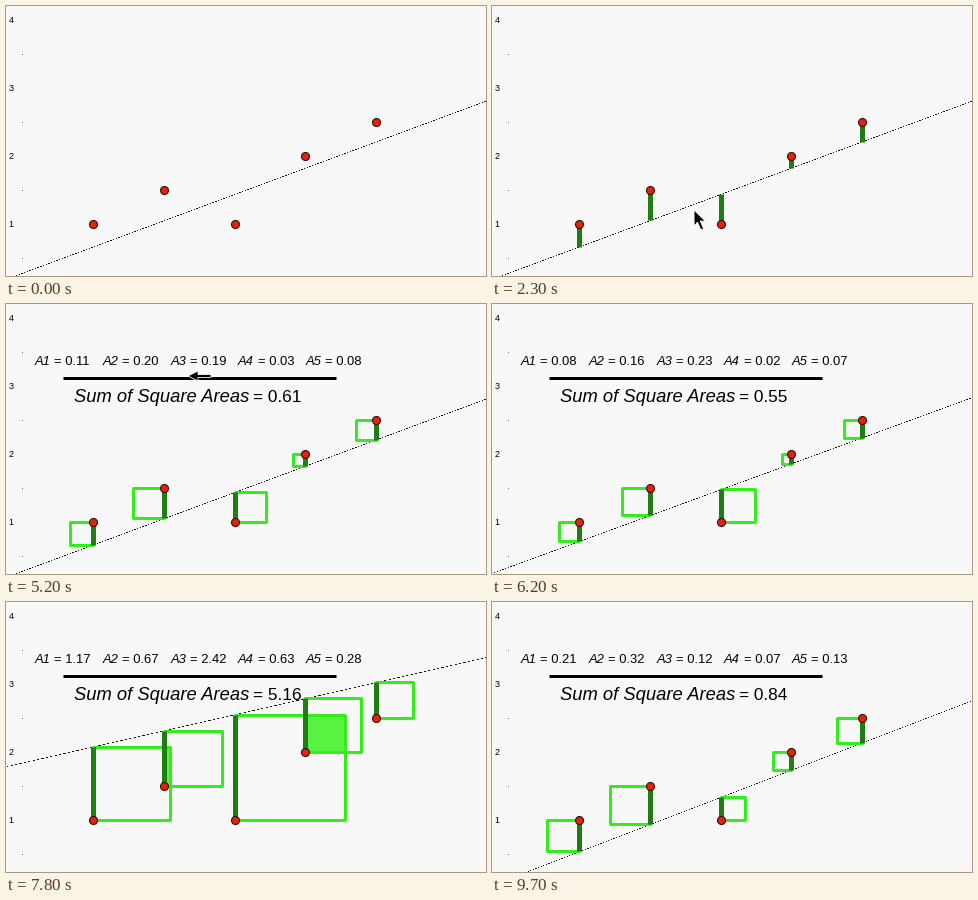
Recreate the animation shown at these times as a matplotlib script. Size 480x270 px, loop 9800 ms.

```python
import numpy as np
import matplotlib.pyplot as plt
from matplotlib.animation import FuncAnimation
from matplotlib.patches import Polygon, Rectangle

W, H, DPI = 480, 270, 100
PX = 72 / DPI  # points per pixel
STEP, FRAMES = 100, 98

BG, RED = "#f8f8f8", "#e8200c"
DARK_GREEN, GREEN, FILL = "#1f7d14", "#32ee1c", "#58f240"
FONT = "Liberation Sans"

DATA = list(enumerate([1, 1.5, 1, 2, 2.5], start=1))
SEGMENTS_AT, SQUARES_AT, SUMS_AT = 600, 3300, 4300

# Dragging the line: (ms, its height at x = 1)
DRAG = [(5600, 0.668), (6000, 0.58), (7000, 1.2755), (7800, 2.081),
        (8500, 1.6265), (9700, 0.5382)]
# Mouse stops: (ms, x, y)
MOUSE = [(1100, 110, 236), (2300, 202, 204), (3000, 376, 128),
         (5200, 182, 72), (5900, 60, 292)]


def sx(x):
    return 16.6 + 70.7 * x


def sy(y):
    return 286 - 67.9 * y


def follow(keys, t):
    """Values of a keyed path at time t."""
    times, *tracks = zip(*keys)
    return [np.interp(t, times, track) for track in tracks]


def arrow(head, half, notch, length, angle):
    """Arrow outline with its tip at the origin, tail towards the angle."""
    side = np.array([(0, 0), (head, half), (notch, 1.5), (length, 1.5)])
    outline = np.vstack([side, side[:0:-1] * (1, -1)])
    c, s = np.cos(np.radians(angle)), np.sin(np.radians(angle))
    return outline @ np.array([(c, s), (-s, c)])


def add_box(**style):
    return ax.add_patch(Rectangle((0, 0), 0, 0, **style))


def set_box(patch, x0, y0, x1, y1):
    patch.set_bounds(x0, y0, x1 - x0, y1 - y0)
    return patch


def stroke(color, width, **kw):
    return ax.plot([], [], color=color, lw=width * PX,
                   solid_capstyle="butt", **kw)[0]


def label(x, y, text, size, style="normal"):
    return ax.text(x, y, text, fontsize=size * PX, family=FONT, style=style,
                   color="black", zorder=6)


fig = plt.figure(figsize=(W / DPI, H / DPI), dpi=DPI, facecolor=BG)
ax = fig.add_axes([0, 0, 1, 1])
ax.set_xlim(0, W)
ax.set_ylim(H, 0)
ax.axis("off")

# Axis numbers and half-unit ticks
for n in range(1, 5):
    label(2.6, sy(n) + 2.5, str(n), 9)
    ax.add_patch(Rectangle((16, round(sy(n - 0.5))), 1, 1, color="#777777",
                           lw=0))

fit_line, = ax.plot([], [], ",", color="#101010", zorder=2)
overlaps = [add_box(fc=FILL, lw=0, zorder=1) for _ in DATA[1:]]
squares = [add_box(fc="none", ec=GREEN, lw=3 * PX, joinstyle="round",
                   zorder=3) for _ in DATA]
segments = [stroke(DARK_GREEN, 5, zorder=4) for _ in DATA]
for x, y in DATA:
    ax.plot(sx(x), sy(y), "o", ms=8 * PX, mfc=RED, mec="#301008",
            mew=1.1 * PX, zorder=5)

# Area read-outs
bar = stroke("black", 3, zorder=6)
bar.set_data([57, 330], [74.3, 74.3])
names = [label(29 + 67.7 * i, 61, f"A{i + 1}", 13, "italic")
         for i in range(len(DATA))]
areas = [label(name.get_position()[0] + 19.5, 61, "", 13) for name in names]
names.append(label(68, 98, "Sum of Square Areas", 18.4, "italic"))
total = label(247, 98, "", 17.3)
readout = [bar, total, *names, *areas]

POINTER = arrow(15, 6.2, 12.5, 21, 67)
LEFT_ARROW = arrow(10, 5, 10, 23, 0)
mouse = ax.add_patch(Polygon(POINTER, fc="black", ec="white", lw=0.8 * PX,
                             zorder=8))


def draw_line(y1, slope):
    """Thin dotted line: only pixels whose centre lies close to it."""
    cols = np.arange(W) + 0.5
    rows = sy(y1 + slope * ((cols - sx(1)) / 70.7))
    centres = np.floor(rows) + 0.5
    near = np.abs(rows - centres) < 0.25
    fit_line.set_data(cols[near], centres[near])


def draw_mouse(t):
    mouse.set_visible(MOUSE[0][0] <= t < MOUSE[-1][0])
    shape = LEFT_ARROW if 5000 <= t <= 5400 else POINTER
    mouse.set_xy(shape + follow(MOUSE, t))


def draw(frame):
    t = frame * STEP
    y1, = follow(DRAG, t)
    slope = 0.4576 - 0.1061 * y1  # the line turns about a far point
    draw_line(y1, slope)

    boxes, gaps = [], []
    for (x, y), segment, square in zip(DATA, segments, squares):
        gap = y1 + slope * (x - 1) - y
        gaps.append(gap)
        segment.set_data([sx(x)] * 2, [sy(y), sy(y + gap)])
        segment.set_visible(t >= SEGMENTS_AT)
        left, right = sorted((sx(x), sx(x + gap)))
        top, bottom = sorted((sy(y), sy(y + gap)))
        boxes.append((left, top, right, bottom))
        set_box(square, *boxes[-1]).set_visible(t >= SQUARES_AT)

    for patch, a, b in zip(overlaps, boxes, boxes[1:]):
        x0, y0 = np.maximum(a[:2], b[:2])
        x1, y1 = np.minimum(a[2:], b[2:])
        set_box(patch, x0, y0, max(x0, x1), max(y0, y1))
        patch.set_visible(t >= SQUARES_AT)

    for text, gap in zip(areas, gaps):
        text.set_text(f"= {gap ** 2:.2f}")
    total.set_text(f"= {sum(gap ** 2 for gap in gaps):.2f}")
    for artist in readout:
        artist.set_visible(t >= SUMS_AT)

    draw_mouse(t)
    return []


anim = FuncAnimation(fig, draw, frames=FRAMES, interval=STEP,
                     init_func=lambda: draw(0), repeat=True, repeat_delay=0)
plt.show()
```
